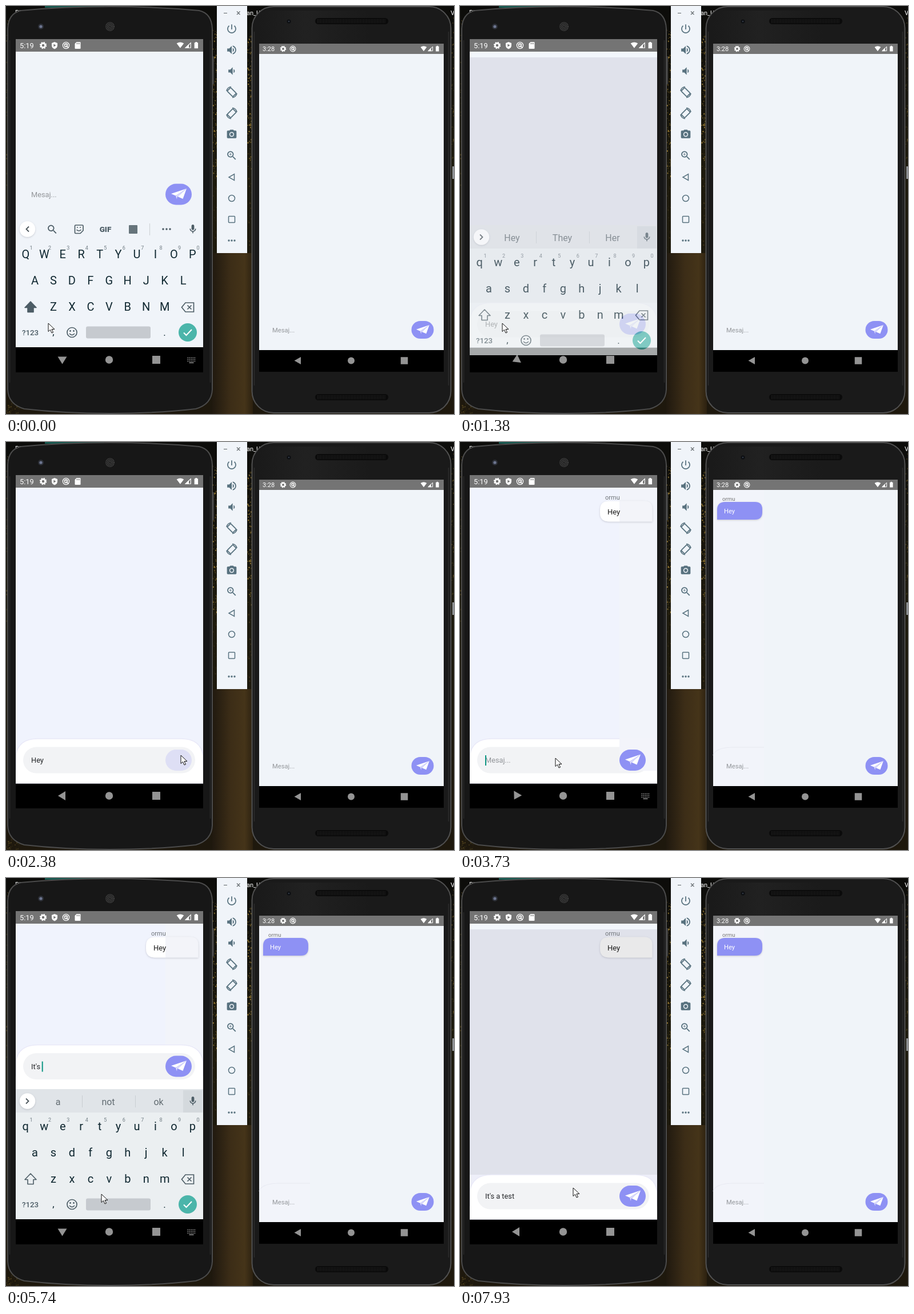
Animation, 784 px wide and 715 px high, one loop 8 s. Source, as an HTML page:

```html
<!DOCTYPE html>
<html lang="en">
<head>
<meta charset="utf-8">
<title>Two phone chat</title>
<style>
html,body{margin:0;width:100%;height:100%;overflow:hidden;background:#15130d}
svg{display:block;width:784px;height:715px}
text{font-family:Roboto,Arial,sans-serif;white-space:pre}
.m{text-anchor:middle}
.u{text-decoration:underline}
</style>
</head>
<body>
<script>
const rect = (x, y, w, h, fill, r = 0, more = '') =>
  `<rect x="${x}" y="${y}" width="${w}" height="${h}" rx="${r}" fill="${fill}" ${more}/>`;
const circ = (x, y, r, fill, more = '') => `<circle cx="${x}" cy="${y}" r="${r}" fill="${fill}" ${more}/>`;
const path = (d, fill, more = '') => `<path d="${d}" fill="${fill}" ${more}/>`;
const line = (d, color, w, more = '') => path(d, 'none', `stroke="${color}" stroke-width="${w}" ${more}`);
const text = (x, y, size, fill, s, more = '') =>
  `<text x="${x}" y="${y}" font-size="${size}" fill="${fill}" ${more}>${s}</text>`;
const group = (id, body, more = '') => `<g id="${id}" ${more}>${body}</g>`;
const icon = (d, x, y, size, fill) =>
  path(d, fill, `fill-rule="evenodd" transform="translate(${x - size / 2} ${y - size / 2}) scale(${size / 24})"`);
const at = (x, y, k, body) => `<g transform="translate(${x} ${y}) scale(${k})">${body}</g>`;

const POWER = 'M13 3h-2v10h2V3zm4.83 2.17l-1.42 1.42C17.99 7.86 19 9.81 19 12c0 3.87-3.13 7-7 7s-7-3.13-7-7c0-2.19 1.01-4.14 2.58-5.42L6.17 5.17C4.23 6.82 3 9.26 3 12c0 4.97 4.03 9 9 9s9-4.03 9-9c0-2.74-1.23-5.18-3.17-6.83z';
const LOUD = 'M3 9v6h4l5 5V4L7 9H3zm13.5 3c0-1.77-1.02-3.29-2.5-4.03v8.05c1.48-.73 2.5-2.25 2.5-4.02zM14 3.23v2.06c2.89.86 5 3.54 5 6.71s-2.11 5.85-5 6.71v2.06c4.01-.91 7-4.49 7-8.77s-2.99-7.86-7-8.77z';
const QUIET = 'M18.5 12c0-1.77-1.02-3.29-2.5-4.03v8.05c1.48-.73 2.5-2.25 2.5-4.02zM5 9v6h4l5 5V4L9 9H5z';
const CAMERA = 'M9 2L7.17 4H4c-1.1 0-2 .9-2 2v12c0 1.1.9 2 2 2h16c1.1 0 2-.9 2-2V6c0-1.1-.9-2-2-2h-3.17L15 2H9zm3 15a5 5 0 1 1 0-10 5 5 0 0 1 0 10zm0-1.8a3.2 3.2 0 1 0 0-6.4 3.2 3.2 0 0 0 0 6.4z';
const LENS = 'M15.5 14h-.79l-.28-.27C15.41 12.59 16 11.11 16 9.5 16 5.91 13.09 3 9.5 3S3 5.91 3 9.5 5.91 16 9.5 16c1.61 0 3.09-.59 4.23-1.57l.27.28v.79l5 4.99L20.49 19l-4.99-5zm-6 0C7.01 14 5 11.99 5 9.5S7.01 5 9.5 5 14 7.01 14 9.5 11.99 14 9.5 14z';
const PLUS = 'M12 10h-2v2H9v-2H7V9h2V7h1v2h2v1z';
const MIC = 'M12 14c1.66 0 3-1.34 3-3V5c0-1.66-1.34-3-3-3S9 3.34 9 5v6c0 1.66 1.34 3 3 3zM17 11c0 2.76-2.24 5-5 5s-5-2.24-5-5H5c0 3.53 2.61 6.43 6 6.92V21h2v-3.08c3.39-.49 6-3.39 6-6.92h-2z';

// dark woodland backdrop
function backdrop() {
  let seed = 7, s = rect(0, 0, 784, 715, 'url(#wood)') + rect(361, 433, 71, 282, 'url(#trunk)');
  const rnd = () => (seed = seed * 16807 % 2147483647) / 2147483647;
  const dots = (x, w, y, h, n, colors) => {
    for (let i = 0; i < n; i++) {
      const r = .6 + rnd() * 1.5;
      s += rect((x + rnd() * w).toFixed(1), (y + rnd() * h).toFixed(1), r.toFixed(1), (r * 1.2).toFixed(1), colors[i % colors.length], 0, 'opacity=".75"');
    }
  };
  const gold = ['#6b5520', '#8d7330', '#3c3519', '#c39c42'];
  dots(361, 8, 40, 260, 110, gold);
  dots(422, 9, 50, 250, 150, gold);
  dots(361, 8, 300, 130, 30, ['#3b3118', '#2c2614']);
  dots(422, 9, 300, 130, 30, ['#4a3a1a', '#2c2614']);
  dots(779, 5, 20, 260, 50, ['#3c3519', '#5b4a20']);
  dots(0, 4, 20, 300, 50, ['#3c3519', '#55451f']);
  dots(0, 24, 692, 22, 40, ['#3c3519', '#55451f']);
  s += rect(68, 0, 104, 3, '#17584f') + rect(781, 281, 3, 22, '#8f9295');
  return s + text(16, 15, 11, '#fff', 'Bi') + text(421, 16, 11, '#fff', 'an_U') + text(778, 16, 11, '#fff', 'V');
}

function toolbar() {
  const c = '#58727f', x = 395;
  const turn = k => at(x, k > 0 ? 151 : 188, 1, `<g transform="scale(${k} 1)">` +
    rect(-4.3, -7, 8.6, 14, 'none', 1, `stroke="${c}" stroke-width="1.8" transform="rotate(-45)"`) +
    line('M-9 -2A9 9 0 0 1 -1 -9.5M9 2A9 9 0 0 1 1 9.5', c, 1.7) + '</g>');
  return rect(369, 0, 53, 433, '#f0f4f9') + line('M381 12.5h6M404 9.5l5.5 5.5m0 -5.5l-5.5 5.5', '#5d6468', 1.1) +
    icon(POWER, x, 40, 21, c) + icon(LOUD, x, 77, 21, c) + icon(QUIET, x, 114, 20, c) + turn(1) + turn(-1) +
    icon(CAMERA, x, 225, 20, c) + icon(LENS + PLUS, x, 262, 21, c) +
    line('M399.5 294.5v11l-9.5 -5.5z', c, 1.5) + circ(x, 337, 5.5, 'none', `stroke="${c}" stroke-width="1.5"`) +
    rect(389.5, 368.5, 11, 11, 'none', 1, `stroke="${c}" stroke-width="1.5"`) +
    [-5, 0, 5].map(d => circ(x + d, 411, 1.7, c)).join('');
}

const gear = circ(0, 0, 3.6, 'none', 'stroke="#fff" stroke-width="2.6"') +
  circ(0, 0, 5.2, 'none', 'stroke="#fff" stroke-width="2" stroke-dasharray="2.3 1.784"');
const ring = circ(0, 0, 5.6, 'none', 'stroke="#fff" stroke-width="1.3"') +
  circ(0, 0, 2.5, 'none', 'stroke="#fff" stroke-width="1.4"') + line('M-3 -1.5A3.6 3.6 0 0 1 3 -1.5M0 0L4.5 4.5', '#fff', 1.2);
const shield = path('M0 -6L5 -4V0Q5 4.5 0 6.5Q-5 4.5 -5 0V-4Z', '#fff') + path('M-1.6 -2.5v5l4 -2.5z', '#747474');
const card = path('M-2 -6H4Q5 -6 5 -5V5Q5 6 4 6H-4Q-5 6 -5 5V-3Z', '#fff') + line('M-1.5 -4.5v2.5m2.2 -2.5v2.5m2.2 -2.5v2.5', '#747474', 1);
const signals = path('M-21 -3.5Q-14.5 -8 -8 -3.5L-14.5 5Z', '#fff') + line('M4.4 -4.5V4.4H-5Z', '#fff', 1.2) +
  path('M1 -2V5H-6Z', '#fff') + path('M11 -5h1.8v-1.3h3V-5h1.8V5.5h-6.6z', '#fff');

// centred on the button
const plane = path('M-13 -1L14 -10L-5 2.5Z', '#fff') + path('M14 -10L7.5 8L-1.5 4Z', '#fff') + path('M-5 3L14 -10L-2.5 4.5L-3 8.5Z', '#dfdffc');
const square = (x, y, w, fill = '#949494') => rect(x - w / 2, y - w / 2, w, w, fill);

function phoneA() {
  const body = 'M3 40Q4 13 26 8Q100 1 182 1Q264 1 338 8Q360 13 361 40V672Q360 698 332 706Q262 714 182 714Q102 714 32 706Q4 698 3 672Z';
  let grill = '';
  for (let r = 2.4; r < 8; r += 2.4) grill += circ(182, 36, r, 'none', 'stroke="#606060" stroke-width="1.1" stroke-dasharray="1 1.3"');
  return rect(360, 88, 4, 49, '#3f3f3f', 1) + path(body, '#171717', 'stroke="#4b4b4b" stroke-width="2"') +
    line('M6.5 60V660M357.5 60V660', '#2b2b2b', 1.5) +
    circ(61, 36, 5, '#2c2f36') + circ(61, 36, 2.6, '#6d7690') + circ(182, 36, 8, '#222') + grill +
    rect(17, 58, 328, 22, '#747474') + text(24, 74, 12.8, '#fff', '5:19') +
    at(65, 69, 1, gear) + at(85, 69, 1, shield) + at(105, 69, 1, ring) + at(125.5, 69, 1, card) + at(319, 69, .97, signals) +
    rect(17, 598, 328, 44, '#000') + group('back', path('M-7.5 0L5.5 -8V8Z', '#949494')) +
    circ(180.5, 620, 6.7, '#949494') + square(263, 620, 14) +
    group('kbi', line('M317.5 616.5h14M317.5 619.5h14M317.5 622.5h14', '#949494', 1.6, 'stroke-dasharray="1.7 1.3"') + rect(320.5, 624.5, 8, 1.5, '#949494'));
}

function phoneB() {
  const slot = y => rect(541, y, 128, 11, '#0b0b0b', 5.5) +
    [3, 5.5, 8].map(d => line(`M545 ${y + d}h120`, '#353535', 1, 'stroke-dasharray="1 1.5"')).join('');
  return rect(430.5, 1, 348, 712, '#1a1a1a', 38, 'stroke="#505050" stroke-width="2"') +
    line('M434.5 45V665M774.5 45V665', '#2d2d2d', 1.5) + rect(442, 8, 325, 58, 'url(#sheen)', 20) +
    slot(21) + slot(680) + circ(495, 27, 3.5, '#0d0f12') + circ(495, 27, 1.3, '#333a46') +
    rect(443, 66, 323, 18, '#747474') + text(449, 79, 11, '#fff', '3:28') + at(485, 75, .85, gear) + at(502, 75, .87, ring) + at(743, 75, .83, signals) +
    rect(443, 84, 323, 519, '#f0f4f9') +
    group('msgB', rect(443, 84, 89, 519, '#f2f4fa') + line('M443 549Q447 536 475 535H532', '#e8eaf2', 1.2) +
      text(459, 102.5, 9.7, '#777', 'ormu') +
      path('M464 105H516Q529 105 529 118V123Q529 136 516 136H450V119Q450 105 464 105Z', '#8e91f4', 'filter="url(#soft)"') +
      text(462, 125, 11.2, '#fff', 'Hey')) +
    text(466, 571.5, 11.2, '#94979b', 'Mesaj...') + rect(709.5, 552, 39, 31, '#8e91f4', 15.5) + at(729, 567.5, .85, plane) +
    rect(443, 603, 323, 38, '#000') + path('M504.5 621.5L516 615V628Z', '#949494') + circ(604, 621.5, 6, '#949494') + square(697, 621.5, 12.5);
}

function keyboard() {
  const ink = '#0f2730', dim = '#4d5d66';
  const row = (keys, x, y, id) => [...keys].map((k, i) => text(x + i * 32.45, y, 20, ink, k, `class="m ${id}"`)).join('');
  const chevron = d => circ(37.5, 391, 13.7, '#fff', 'filter="url(#soft)"') + line(d, '#4a545a', 1.8);
  const arrow = 'M43 518L53 528.5H48V536.5H38V528.5H33Z';
  return group('solid', rect(17, 411, 328, 187, '#ebeff1') + rect(17, 370, 328, 41, '#e0e4e8') + rect(310, 372, 33, 39, '#d4d9dd')) +
    group('tools', chevron('M40 386.5l-4.5 4.5l4.5 4.5') + icon(LENS, 81, 391.5, 21, dim) +
      path('M122 384h11.5q1.5 0 1.5 1.5v8l-5 5h-8q-1.500 0 -1.500 -1.500v-11.500q0 -1.500 1.500 -1.500z', 'none', `stroke="${dim}" stroke-width="1.7"`) +
      line('M124 388h2m3 0h2M123.500 392q4 4 8 0', dim, 1.5) + text(174, 396, 13.5, dim, 'GIF', 'class="m" font-weight="900"') +
      rect(215, 384, 15, 15, '#66747b', 1) + line('M251.5 381v21', '#cfd4d8', 1.2) + [-6, 0, 6].map(d => circ(281 + d, 391, 1.8, dim)).join('')) +
    group('hints', chevron('M35 386.500l4.500 4.500l-4.500 4.500') + line('M133.500 381v21M226.500 381v21', '#c9ced2', 1) +
      [91, 179, 267].map((x, i) => text(x, 397.500, 16, '#626c72', '', `class="m" id="h${i}"`)).join('')) +
    icon(MIC, 327, 391, 19, dim) +
    row('qwertyuiop', 34.3, 441.500, 'k') + row('asdfghjkl', 50.5, 488, 'k') + row('zxcvbnm', 83, 534, 'k') +
    [...'1234567890'].map((n, i) => text(44 + i * 32.45, 426.500, 9, '#707c83', n, 'class="m"')).join('') +
    path(arrow, dim, 'id="shift" stroke="#4d5d66" stroke-width="1.6" stroke-linejoin="round"') +
    line('M314 520H328.500V536H314L307.500 528ZM317.500 524.500l7 7m0 -7l-7 7', dim, 1.7) +
    text(42.500, 577, 13.300, dim, '?123', 'class="m" font-weight="500"') + text(83, 577, 17, ink, ',', 'class="m"') + text(277.500, 578, 17, ink, '.', 'class="m"') +
    circ(115.500, 572, 8.500, 'none', `stroke="${dim}" stroke-width="1.700"`) + circ(112.500, 569.500, 1.400, dim) + circ(118.500, 569.500, 1.400, dim) +
    line('M111 574q4.500 5 9 0', dim, 1.600) + rect(140, 561.500, 113, 21, '#c6cacf', 3) +
    circ(318, 572, 16, '#4bb5aa') + line('M311 572.500l4.500 4.500l9.500 -10', '#fff', 2);
}

function chatA() {
  const panel = 'M17 598V549Q22 520 55 520H307Q340 520 345 549V598Z';
  const mid = 557.5;
  return rect(17, 80, 328, 518, '#f0f4f9', 0, 'id="chat"') + rect(17, 80, 328, 10, '#f2f6fb', 0, 'id="band"') +
    rect(279, 80, 66, 518, '#f2f4fa', 0, 'id="side"') +
    group('msgA', text(254, 101, 11, '#70757a', 'ormu') +
      path('M261 103.500H323Q336.500 103.500 336.500 117V139.500H261Q245 139.500 245 124V119Q245 103.500 261 103.500Z', '#fff', 'id="bubble" filter="url(#soft)"') +
      text(258, 127, 13, '#1b1b1b', 'Hey')) +
    group('bar', group('panel', rect(17, 520, 328, 30, '#eeeff9', 0, 'id="corner"') + path(panel, '#fff', 'stroke="#e9e9f8" stroke-width="1.500"') + rect(17, 575, 328, 23, '#fff') +
      rect(30, 534.500, 301, 46, '#f2f3f5', 23)) +
      rect(279, 519, 66, 57, '#f3f4fa', 0, 'id="patch"') +
      text(44, mid + 4.700, 12.800, '#222', '<tspan id="plain"></tspan><tspan id="comp" class="u"></tspan>', 'id="msg"') +
      rect(44, 549, 2, 18, '#0d9683', 0, 'id="caret"') +
      rect(279, 539, 46, 37, '#8e91f4', 18.500, 'id="send"') + group('plane', at(302, mid, 1, plane)));
}

document.body.innerHTML = `<svg viewBox="0 0 784 715"><defs>
<linearGradient id="wood" x2="0" y2="1"><stop stop-color="#0c0c0a"/><stop offset=".4" stop-color="#1d1a0d"/><stop offset="1" stop-color="#1e180d"/></linearGradient>
<linearGradient id="trunk"><stop stop-color="#20190f"/><stop offset=".45" stop-color="#3c2d17"/><stop offset=".8" stop-color="#453419"/><stop offset="1" stop-color="#2c2110"/></linearGradient>
<linearGradient id="sheen"><stop stop-color="#1a1a1a"/><stop offset=".25" stop-color="#212121"/><stop offset=".6" stop-color="#1a1a1a"/></linearGradient>
<linearGradient id="split"><stop offset=".374" stop-color="#fff"/><stop offset=".374" stop-color="#f3f4f9"/></linearGradient>
<filter id="soft" x="-20%" y="-30%" width="140%" height="170%"><feDropShadow dx="0" dy="1" stdDeviation="1.800" flood-color="#667" flood-opacity=".32"/></filter>
<clipPath id="screen"><path d="M17 80H345V642H17Z"/></clipPath></defs>
${backdrop() + phoneA() + phoneB() + toolbar()}
<g clip-path="url(#screen)">${chatA() + group('kb', keyboard())}</g>
${group('mouse', path('M0 0V14.500L3.500 11.300L6 17L8.500 16L6 10.500H11Z', '#fff', 'stroke="#111" stroke-width="1"'))}</svg>`;

const $ = id => document.getElementById(id);
const set = (id, o) => { for (const k in o) $(id).setAttribute(k, o[k]); };
const show = (id, on) => set(id, { opacity: +on });
const keys = [...document.querySelectorAll('.k')].map(el => [el, el.textContent]);

const open = { up: 1, kb: 1, dy: 0, rot: -90, kbi: 1 };
const closing = { up: 0, flat: 0, kb: .7, dy: 14, rot: -25, kbi: 0, dim: 1, solid: 1, caret: 0, comp: '' };
const closed = { kb: 0, rot: 0 };
const type = (text, comp, hints) => ({ text, comp, hints: hints.split(' '), caps: 0, caret: 1 });

// every step merges into the state before it
const steps = [
  [0, { ...open, text: '', comp: '', hints: [], caps: 1, caret: 0, flat: 1, solid: 0, dim: 0, press: 0, a: 0, b: 0, x: 74, y: 556 }],
  [280, { caret: 1 }],
  [560, type('', 'H', 'H Hey He')],
  [860, type('', 'He', 'He Hey Her')],
  [1000, type('', 'Hey', 'Hey They Her')],
  [1230, { ...closing, text: 'Hey', kb: .93, dy: 3, rot: -78 }],
  [1380, closing],
  [1530, closed],
  [1810, { x: 98, y: 558 }],
  [1950, { x: 172, y: 560 }],
  [2100, { x: 262, y: 553 }],
  [2240, { x: 306, y: 549, dim: 0 }],
  [2380, { press: 1 }],
  [2530, { press: 0, text: '', a: 1 }],
  [2670, { b: 1 }],
  [2920, { x: 284, y: 547 }],
  [3070, { x: 205, y: 551 }],
  [3220, { x: 167, y: 554 }],
  [3490, { caret: 1 }],
  [3610, { rot: -20, kbi: 1 }],
  [3730, { rot: -60 }],
  [3880, { rot: -85, kb: .8, dy: 8, caps: 1 }],
  [4000, open],
  [4530, type('', 'I', "I I'm It")],
  [4780, type('', 'It', "It It's Its")],
  [5180, type('', "It'", "It' It's It'll")],
  [5460, type('', "It's", "It's Its It'd")],
  [5740, type("It's ", '', 'a not ok')],
  [6010, type("It's ", 'a', 'a and at')],
  [6150, type("It's a ", '', 'good great little')],
  [6290, type("It's a ", 't', 't to the')],
  [6430, type("It's a ", 'te', 'te test tell')],
  [6560, type("It's a ", 'tes', 'test tes testing')],
  [6700, type("It's a ", 'test', 'test testimony testament')],
  [7260, { caret: 0 }],
  [7380, { ...closing, text: "It's a test" }],
  [7530, closed],
  [7930, { x: 198, y: 543 }]
];

function draw(s) {
  const empty = !(s.text + s.comp);
  set('chat', { fill: s.flat ? '#f0f4f9' : s.dim ? '#e0e2eb' : '#f0f3fd' });
  show('band', s.dim);
  show('corner', s.dim);
  show('side', s.a && !s.dim);
  show('patch', s.a && !s.dim && !s.up);
  show('msgA', s.a);
  show('msgB', s.b);
  set('bubble', { fill: s.dim ? '#e9e9ea' : 'url(#split)' });
  set('bar', { transform: `translate(0 ${s.up ? -227.5 : 0})` });
  show('panel', !s.flat);
  $('plain').textContent = empty ? 'Mesaj...' : s.text;
  $('comp').textContent = s.comp;
  set('msg', { fill: empty ? '#929599' : '#242629' });
  set('caret', { opacity: s.caret, x: 43.5 + (empty ? .5 : $('msg').getComputedTextLength()) });
  set('send', { fill: s.press ? '#dedff5' : '#8e91f4' });
  show('plane', !s.press);
  set('kb', { opacity: s.kb, transform: `translate(0 ${s.dy})` });
  show('solid', s.solid);
  show('tools', s.caps);
  show('hints', !s.caps);
  s.hints.forEach((h, i) => $('h' + i).textContent = h);
  keys.forEach(([el, k]) => el.textContent = s.caps ? k.toUpperCase() : k);
  set('shift', { fill: s.caps ? '#4d5d66' : 'none' });
  set('back', { transform: `translate(98.5 620) rotate(${s.rot})` });
  show('kbi', s.kbi);
  set('mouse', { transform: `translate(${s.x} ${s.y})` });
}

let last = -1;
function frame(now) {
  const t = now % 8000, n = steps.filter(s => s[0] <= t).length;
  if (n !== last) draw(Object.assign({}, ...steps.slice(0, n).map(s => s[1])));
  last = n;
  requestAnimationFrame(frame);
}
frame(0);
</script>
</body>
</html>
```
